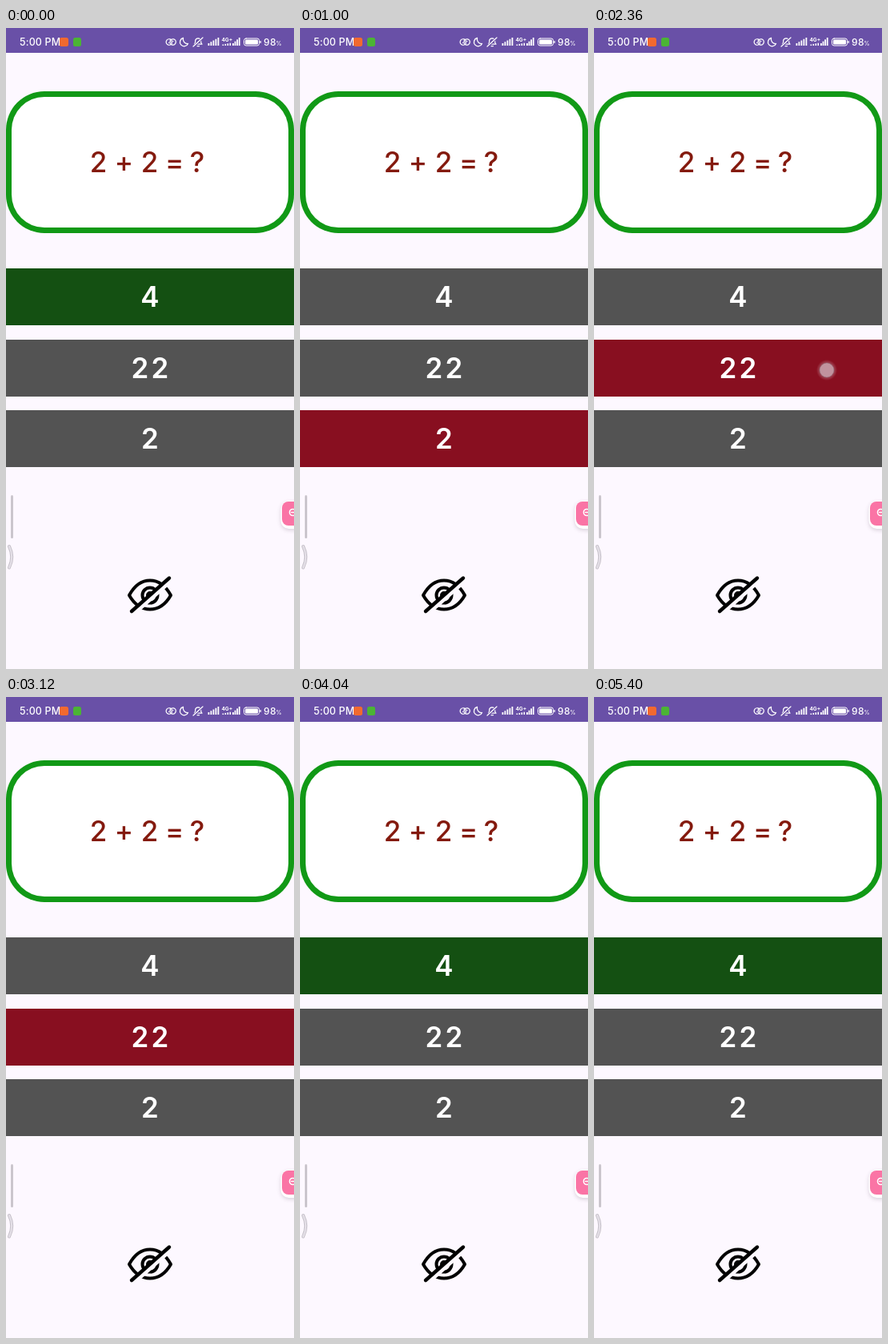
An HTML page with a canvas that plays this animation: 360 by 800 pixels, repeating every 5440 ms.

```html
<!DOCTYPE html>
<html lang="en">
<head>
<meta charset="utf-8">
<title>Quiz</title>
<style>
html, body { margin: 0; width: 100%; height: 100%; overflow: hidden; background: #fdf8ff; }
canvas { display: block; width: 360px; height: 800px; }
</style>
</head>
<body>
<canvas id="stage"></canvas>
<script>
const LOOP = 5440;
const BG = '#fdf8ff', GREY = '#535353', GREEN = '#145012', RED = '#880f20';
const BARS = [
  { y: 300, label: '4', color: GREEN },
  { y: 389, label: '22', color: RED },
  { y: 477, label: '2', color: RED }
];
// Each tap selects its bar at the moment of release.
const TAPS = [
  { x: 271, y: 513, down: 660, up: 840, bar: 2 },
  { x: 291, y: 427, down: 2160, up: 2320, bar: 1 },
  { x: 288, y: 338, down: 3660, up: 3840, bar: 0 }
];

const canvas = document.getElementById('stage');
const c = canvas.getContext('2d');
const dpr = window.devicePixelRatio || 1;
canvas.width = 360 * dpr;
canvas.height = 800 * dpr;

function rect(x, y, w, h, color) {
  c.fillStyle = color;
  c.fillRect(x, y, w, h);
}

function round(x, y, w, h, r) {
  c.beginPath();
  c.roundRect(x, y, w, h, r);
}

function fillRound(x, y, w, h, r, color) {
  round(x, y, w, h, r);
  c.fillStyle = color;
  c.fill();
}

function stroke(d, color, width, cap = 'round') {
  c.strokeStyle = color;
  c.lineWidth = width;
  c.lineCap = cap;
  c.lineJoin = 'round';
  c.stroke(new Path2D(d));
}

function ring(x, y, r, width, color, from = 0, to = Math.PI * 2) {
  c.beginPath();
  c.arc(x, y, r, from, to);
  c.strokeStyle = color;
  c.lineWidth = width;
  c.stroke();
}

function text(s, x, y, size, weight, color, align = 'center', gap = 0) {
  c.font = `${weight} ${size}px Inter, "Open Sans", sans-serif`;
  c.letterSpacing = gap + 'px';
  c.textAlign = align;
  c.fillStyle = color;
  c.fillText(s, x, y);
}

function signal(x, n, step) {
  for (let i = 0; i < n; i++) {
    const h = 3 + i * 7 / (n - 1);
    rect(x + i * step, 22 - h, 1.8, h, '#fff');
  }
}

function statusBar() {
  rect(0, 0, 360, 31, '#6950a7');
  text('5:00 PM', 17, 22, 12.5, 500, '#fff', 'left', 0.15);
  fillRound(67, 12, 11, 11, 2.5, '#f2692f');
  fillRound(84, 12, 10, 11, 2.5, '#4bb434');

  ring(203.9, 17.5, 3.7, 1.3, '#fff', 0.3, 5.8);
  ring(208.6, 17.5, 3.7, 1.3, '#fff', 3.4, 8.9);
  stroke('M203.5 18.5L209 16.5', '#fff', 1.2);
  stroke('M221.5 12.5A5.2 5.2 0 1 0 227.5 19.5A5.6 5.6 0 0 1 221.5 12.5Z', '#fff', 1.3);
  stroke('M235.5 20.2H245L243.7 18V15.8A3.6 3.6 0 0 0 236.6 15.8V18ZM239 22.6H241.5', '#fff', 1.2);
  stroke('M234 23.5L246 12', '#6950a7', 3);
  stroke('M234 23L246 12', '#fff', 1.2);

  signal(252.5, 5, 3);
  text('4G+', 276.3, 16.6, 6.5, 700, '#fff');
  for (let i = 0; i < 4; i++) rect(270.5 + i * 3, 20.5 - i * 0.6, 1.6, 1.5 + i * 0.6, '#fff');
  signal(283, 4, 2.6);

  round(297.5, 13, 19, 9, 2.6);
  c.strokeStyle = '#fff';
  c.lineWidth = 1;
  c.stroke();
  fillRound(299, 14.5, 16, 6, 1.3, '#fff');
  rect(317.5, 16, 1.3, 3, '#fff');
  text('98', 322, 22, 12, 500, '#fff', 'left', 0.5);
  text('%', 337.5, 22, 7, 500, '#fff', 'left');
}

function card() {
  fillRound(0, 79, 360, 177, 48, '#119916');
  fillRound(7, 86, 346, 163, 41, '#fff');
  const spots = { 115.5: '2', 147.5: '+', 179.5: '2', 210.7: '=', 239: '?' };
  for (const x in spots) text(spots[x], +x, 180, 35, 500, '#841a0e');
}

function bars(selected) {
  BARS.forEach((b, i) => {
    rect(0, b.y, 360, 71, i === selected ? b.color : GREY);
    const mid = (b.label.length - 1) / 2;
    [...b.label].forEach((ch, k) =>
      text(ch, 180 + (k - mid) * 25, b.y + 47.5, 35, 600, '#fff'));
  });
}

function edgeHandles() {
  fillRound(6, 583, 3, 54, 1.5, '#cbc6cd');
  stroke('M4 647Q10.5 660 4 673.5', '#c4bfc7', 4);
  stroke('M4 647Q10.5 660 4 673.5', '#e5e0e8', 2.2);

  c.save();
  c.shadowColor = 'rgba(80, 60, 80, .2)';
  c.shadowBlur = 5 * dpr;
  c.shadowOffsetY = 2 * dpr;
  fillRound(343.5, 590, 36, 35, 10, '#fff');
  c.restore();
  fillRound(345, 591, 36, 30, 8, '#fa74a5');
  ring(358.5, 604.5, 4, 1.6, '#fff');
  stroke('M356.7 604.5H360', '#fff', 1.4);
}

function eye() {
  stroke('M154 708Q164 689.5 180 689.5T206 708Q196 725.5 180 725.5T154 708Z', '#000', 4);
  ring(180, 708, 9.5, 4, '#000');
  ring(180, 708, 3.5, 3, '#000');
  stroke('M160 731L208 688.5', BG, 5, 'butt');
  stroke('M157 728L204 686.5', '#000', 4.4);
}

function touch(tap, t) {
  const inn = Math.min(1, (t - tap.down) / 60);
  const out = Math.min(1, 1 - (t - tap.up) / 130);
  const a = Math.min(inn, out);
  if (a <= 0) return;
  c.save();
  c.globalAlpha = a;
  const glow = c.createRadialGradient(tap.x, tap.y, 8, tap.x, tap.y, 13);
  glow.addColorStop(0, 'rgba(235, 230, 240, .45)');
  glow.addColorStop(1, 'rgba(235, 230, 240, 0)');
  c.fillStyle = glow;
  c.fillRect(tap.x - 13, tap.y - 13, 26, 26);
  c.beginPath();
  c.arc(tap.x, tap.y, 9, 0, Math.PI * 2);
  c.fillStyle = 'rgba(220, 214, 222, .72)';
  c.fill();
  ring(tap.x, tap.y, 9, 1, 'rgba(120, 115, 122, .5)');
  c.restore();
}

function draw(now) {
  const t = now % LOOP;
  const selected = TAPS.reduce((s, tap) => t >= tap.up ? tap.bar : s, 0);
  c.setTransform(dpr, 0, 0, dpr, 0, 0);
  rect(0, 0, 360, 800, BG);
  statusBar();
  card();
  bars(selected);
  edgeHandles();
  eye();
  TAPS.forEach(tap => touch(tap, t));
}

const start = performance.now();
function tick() {
  draw(performance.now() - start);
  requestAnimationFrame(tick);
}
tick();
</script>
</body>
</html>
```
